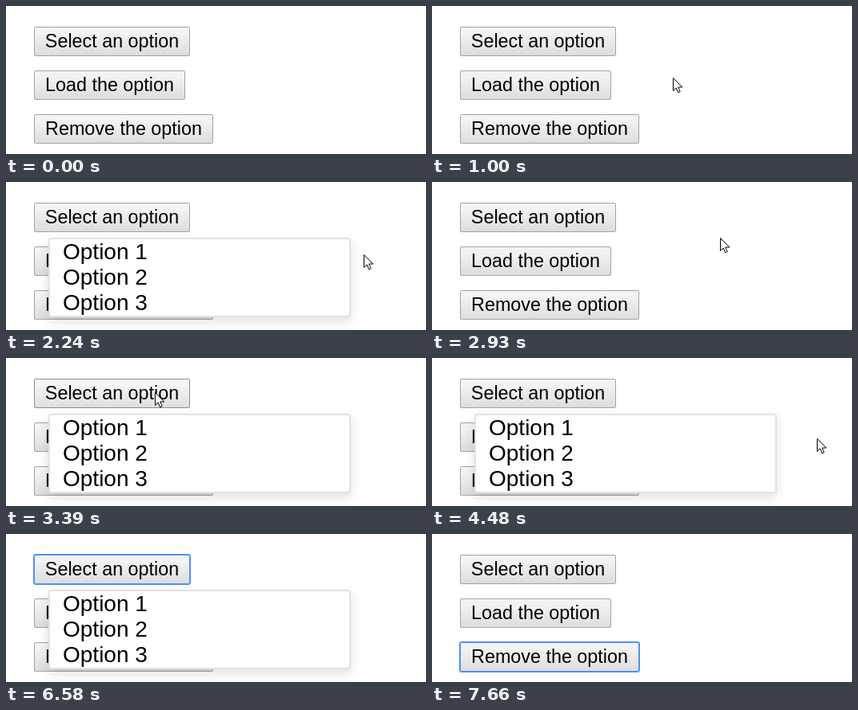
Recreate the animation shown at these times as an HTML page. Size 525 by 186 pixels, loop 8 s.

```html
<!DOCTYPE html>
<html lang="en">
<head>
<meta charset="utf-8">
<title>Option menu</title>
<style>
  html, body { margin: 0; width: 100%; height: 100%; overflow: hidden; background: #fff; }
  body { position: relative; font-family: "Liberation Sans", Arial, sans-serif; color: #000; }
  .button, .menu, #cursor { position: absolute; box-sizing: border-box; }
  .button {
    left: 35px; height: 37px; line-height: 35px;
    font-size: 23.33px; text-align: center; white-space: nowrap;
    border: 1px solid #a3a3a3; border-radius: 2px;
    background: linear-gradient(#f3f3f3 20%, #dddddd);
  }
  .button.hover { border-color: #8c8c8c; background: linear-gradient(#f5f5f5 20%, #dfdfdf); }
  .button.pressed { border-color: #8c8c8c; background: linear-gradient(#e7e7e7 20%, #d3d3d3); }
  .button.focus { border-color: #4d90fe; box-shadow: 0 0 0 1px #4d90fe; }
  .menu {
    left: 53px; top: 70px; width: 378px; height: 100px; padding-left: 16px;
    font-size: 28px; line-height: 32px; background: #fff;
    border: 2px solid #e3e3e3; border-radius: 4px;
    box-shadow: 0 5px 14px rgba(0, 0, 0, .13);
  }
  #cursor { left: 0; top: 0; }
</style>
</head>
<body>
<div class="button" style="top:26px;width:195px">Select an option</div>
<div class="button" style="top:81px;width:189px">Load the option</div>
<div class="button" style="top:136px;width:224px">Remove the option</div>
<div class="menu"><div>Option 1</div><div>Option 2</div><div>Option 3</div></div>
<svg id="cursor" width="13" height="20">
  <path d="M.5.5V16.5L4.2 13 6.7 18.8 9.2 17.7 6.7 12H11.8Z" fill="#fff" stroke="#000"/>
</svg>
<script>
const LOOP = 8000;
const buttons = [...document.querySelectorAll('.button')];
const menu = document.querySelector('.menu');
const cursor = document.getElementById('cursor');

// Pointer moves: first step, last step, step count, from, to, upward bend
const moves = [
  [530, 1160, 9, [469, 192], [217, 39], 0],
  [1860, 2240, 6, [217, 39], [447, 91], 0],
  [2780, 3180, 6, [447, 91], [186, 43], 6],
  [3870, 4480, 9, [186, 43], [481, 101], 0],
  [4940, 4940, 1, [481, 101], [484, 101], 0]
];
const pointerShown = [[530, 5020]];
const pressed = [[1232, 1310], [3320, 3390]];
const menuOpen = [[1310, 2320], [3390, 4710], [6580, 7190]];
const focused = [[[5800, 7190]], [[7190, 7660]], [[7660, LOOP]]];

const during = (spans, t) => spans.some(([start, end]) => t >= start && t < end);

function pointerAt(t) {
  const move = moves.filter(m => t >= m[0]).pop() || moves[0];
  const [start, end, steps, from, to, bend] = move;
  const gap = (end - start) / (steps - 1 || 1) || 1;
  const step = Math.floor((t - start) / gap + 1e-6) + 1;
  const p = Math.max(0, Math.min(1, step / steps));
  const mix = i => from[i] + (to[i] - from[i]) * p;
  return [Math.round(mix(0)), Math.round(mix(1) - bend * 4 * p * (1 - p))];
}

function draw() {
  const t = performance.now() % LOOP;
  const [x, y] = pointerAt(t);
  const shown = during(pointerShown, t);
  const open = during(menuOpen, t);
  cursor.style.visibility = shown ? 'visible' : 'hidden';
  cursor.style.transform = `translate(${x}px, ${y}px)`;
  menu.style.visibility = open ? 'visible' : 'hidden';
  buttons.forEach((button, i) => {
    const over = shown && x >= 35 && x < 35 + button.offsetWidth &&
      y >= button.offsetTop && y < button.offsetTop + 37;
    button.classList.toggle('hover', over);
    button.classList.toggle('pressed', over && during(pressed, t));
    button.classList.toggle('focus', during(focused[i], t));
  });
  requestAnimationFrame(draw);
}
draw();
</script>
</body>
</html>
```
